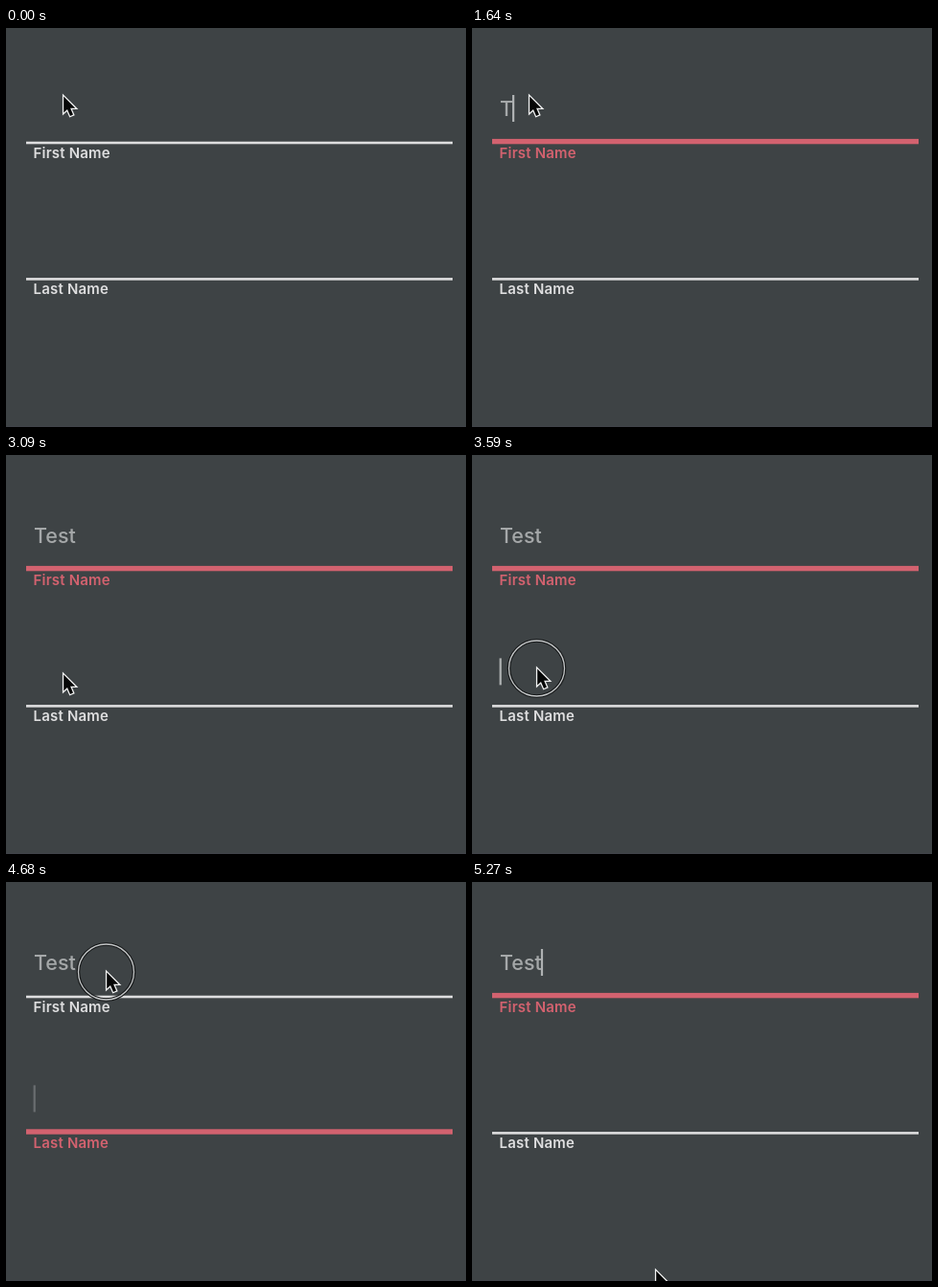
These frames come from a looping animation (480x417 px, 5.31 s). An HTML page with a canvas:

```html
<!DOCTYPE html>
<html lang="en">
<head>
<meta charset="utf-8">
<title>Focus lines</title>
<style>
  html, body { margin: 0; width: 100%; height: 100%; overflow: hidden; background: #3e4345; }
  canvas { display: block; width: 480px; height: 417px; }
</style>
</head>
<body>
<canvas id="stage"></canvas>
<script>
const W = 480, H = 417, LOOP = 5310;
const canvas = document.getElementById('stage');
const ctx = canvas.getContext('2d');
const ratio = window.devicePixelRatio || 1;
canvas.width = W * ratio;
canvas.height = H * ratio;

const LIGHT = [222, 222, 223], RED = [211, 98, 111];
const INK = '#a5a8a9';
const FADE = 250, BLINK = 530, CARET_FADE = 80;
const VALUE_FONT = '500 21.5px Inter, sans-serif';
const LABEL_FONT = '600 15px Inter, sans-serif';

// Times at which fields gain focus and letters arrive
const FOCUS_A = 450, FOCUS_B = 3590, REFOCUS_A = 4740;
const KEYS = [1590, 1720, 1860, 2050];
const PRESSES = [[3540, 3690], [4640, 4790]];

// Pointer path: start, end, from, to, easing
const clamp = v => Math.min(1, Math.max(0, v));
const smooth = v => v * v * (3 - 2 * v);
const speedUp = v => Math.pow(v, 1.5);
const MOVES = [
  [2600, 3000, [59, 69], [59, 227], smooth],
  [3140, 3360, [59, 227], [67, 221], smooth],
  [4060, 4540, [67, 221], [104, 92], smooth],
  [5095, 5270, [104, 92], [191, 404], speedUp]
];

const lerp = (a, b, k) => a + (b - a) * k;
const ramp = (t, start, span) => smooth(clamp((t - start) / span));
const mix = k => `rgb(${LIGHT.map((c, i) => Math.round(lerp(c, RED[i], k))).join(',')})`;

function pointerAt(t) {
  let pos = MOVES[0][2];
  for (const [start, end, from, to, ease] of MOVES) {
    if (t < start) break;
    const k = ease(clamp((t - start) / (end - start)));
    pos = from.map((c, i) => lerp(c, to[i], k));
  }
  return pos;
}

// Caret opacity, counted from the last focus or key
function caretAlpha(age) {
  const phase = age % (2 * BLINK);
  if (age < BLINK) return 1;
  return phase < BLINK
    ? clamp(phase / CARET_FADE)
    : 1 - clamp((phase - BLINK) / CARET_FADE);
}

function drawField(y, label, value, focus) {
  ctx.fillStyle = mix(focus);
  const thick = lerp(2.6, 5.4, focus);
  ctx.fillRect(21, y + 121.3 - thick, 445, thick);
  ctx.font = LABEL_FONT;
  ctx.letterSpacing = '0.2px';
  ctx.fillText(label, 28.5, y + 136);
  ctx.font = VALUE_FONT;
  ctx.letterSpacing = '0px';
  ctx.fillStyle = INK;
  ctx.fillText(value, 29, y + 92.4);
}

function drawCaret(y, value, alpha) {
  ctx.font = VALUE_FONT;
  ctx.letterSpacing = '0px';
  const x = value ? 28 + ctx.measureText(value).width : 28.6;
  ctx.globalAlpha = alpha;
  ctx.fillStyle = '#b0b3b4';
  ctx.fillRect(x, y + 70, 2.2, 28);
  ctx.globalAlpha = 1;
}

function drawRing(x, y) {
  ctx.beginPath();
  ctx.arc(x + 0.5, y + 2, 29, 0, 2 * Math.PI);
  ctx.lineWidth = 3.6;
  ctx.strokeStyle = '#17191a';
  ctx.stroke();
  ctx.lineWidth = 1.3;
  ctx.strokeStyle = '#c4c7c8';
  ctx.stroke();
}

function drawPointer(x, y) {
  const shape = [[1.2, 2.6], [1.2, 19.6], [5, 16], [8, 22.9], [11, 21.6], [8.1, 14.8], [13.3, 14.8]];
  ctx.beginPath();
  shape.forEach(([dx, dy]) => ctx.lineTo(x + dx, y + dy));
  ctx.closePath();
  ctx.lineWidth = 2.6;
  ctx.strokeStyle = '#f2f3f3';
  ctx.stroke();
  ctx.fillStyle = '#060707';
  ctx.fill();
}

function draw(t) {
  ctx.setTransform(ratio, 0, 0, ratio, 0, 0);
  ctx.fillStyle = '#3e4345';
  ctx.fillRect(0, 0, W, H);
  ctx.fillStyle = '#41444a';
  ctx.fillRect(0, H - 1, W, 1);

  const typed = KEYS.filter(k => t >= k);
  const value = 'Test'.slice(0, typed.length);
  const focusB = ramp(t, FOCUS_B, FADE) - ramp(t, REFOCUS_A, FADE);
  const focusA = ramp(t, FOCUS_A, FADE) - focusB;
  drawField(0, 'First Name', value, focusA);
  drawField(142.4, 'Last Name', '', focusB);

  const inB = t >= FOCUS_B && t < REFOCUS_A;
  const since = Math.max(...[FOCUS_A, FOCUS_B, REFOCUS_A, ...KEYS].filter(s => s <= t));
  if (t >= FOCUS_A) drawCaret(inB ? 142.4 : 0, inB ? '' : value, caretAlpha(t - since));

  const [x, y] = pointerAt(t);
  if (PRESSES.some(([down, up]) => t >= down && t < up)) drawRing(x, y);
  drawPointer(x, y);
}

const begin = performance.now();
function tick() {
  draw((performance.now() - begin) % LOOP);
  requestAnimationFrame(tick);
}
tick();
</script>
</body>
</html>
```
